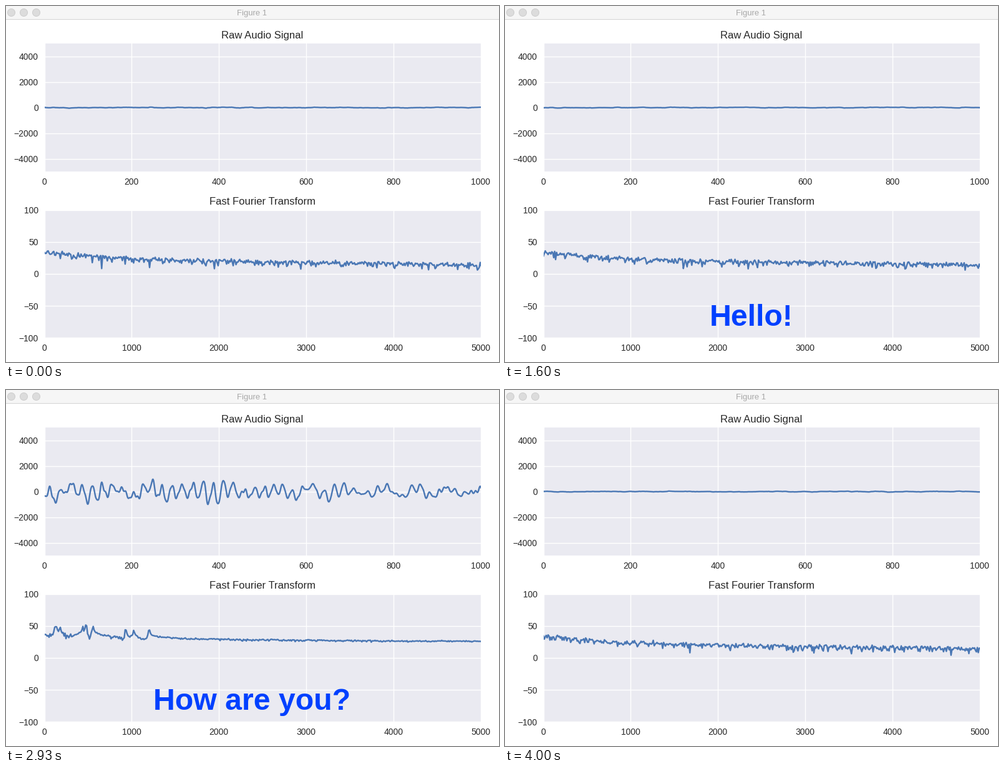
These frames come from a looping animation (790x570 px, 4130 ms). A matplotlib script:

```python
import numpy as np
import matplotlib.pyplot as plt
from matplotlib.animation import FuncAnimation
from matplotlib.patches import Circle, Rectangle

W, H, DPI = 790, 570, 100
RATE, SIZE = 11025, 1024
LOOP, STEP = 4130, 35
INK = "#262626"

x = np.arange(SIZE)
freq = np.fft.rfftfreq(SIZE, 1 / RATE)

# Refresh times of the plots in ms; a stalled refresh repeats the one before.
starts = 10 * np.round(np.arange(61) * 20 / 3)
STALLS = (27, 43, 58)
CLICK_TICK = 11
HUM_TICKS = range(32, 36)


def loudness(tick):
    """Power of ten of the speech peak: two words, each swelling and fading."""
    return np.interp(tick, [24, 25, 29, 35, 40, 42, 44, 46, 50, 52, 58],
                     [1, 3.8, 3.9, 1.2, 1, 2.85, 3, 3.85, 3.95, 3.6, 1])


def caption_at(tick):
    if 21 <= tick < 39:
        return "Hello!"
    return "How are you?" if 39 <= tick < 56 else ""


def room_noise(rng, lift):
    floor = 17.5 + 17 * np.exp(-freq / 1100) - 4 * (freq / 5000) ** 4 + lift
    re, im = rng.normal(scale=np.sqrt(0.5), size=(2, freq.size))
    return np.fft.irfft(10 ** (floor / 10) * (re + 1j * im), SIZE)


def partials(rng, freqs):
    phases = rng.uniform(0, 2 * np.pi, len(freqs))
    return np.sin(2 * np.pi * np.outer(freqs, x) / RATE + phases[:, None]).sum(axis=0)


def voice(rng):
    """Three formants, each a cluster of close partials."""
    total = sum(weight * partials(rng, rng.normal(centre, 0.12 * centre, 5))
                for centre, weight in ((150, 0.8), (500, 1), (1080, 0.25)))
    return total / np.abs(total).max()


def hum():
    turn = 2 * np.pi / SIZE
    swell = 0.65 + 0.35 * np.cos(4 * turn * (x - 380))
    return swell * np.cos(51 * turn * (x - 47))


def click(rng):
    """A growing ripple that ends in a short damped pulse."""
    since = x - 995
    ripple = partials(rng, rng.uniform(700, 1500, 40))
    ripple *= 180 / ripple.std() * np.exp(since / 270)
    t = np.maximum(since, 0)
    pulse = -1900 * np.sin(2 * np.pi * 1600 * t / RATE) * np.exp(-t / 8)
    return np.where(since < 0, ripple, pulse)


def record(tick):
    if tick in STALLS:
        tick -= 1
    rng = np.random.default_rng(100 + tick)
    loud = loudness(tick)
    noise = room_noise(rng, 1.5 * (loud - 1))
    if tick == CLICK_TICK:
        return noise + click(rng)
    if loud == 1:
        return noise
    return noise + 10 ** loud * (hum() if tick in HUM_TICKS else voice(rng))


signals = [record(k) for k in range(len(starts))]
spectra = [10 * np.log10(np.abs(np.fft.rfft(s)) + 0.5) for s in signals]

plt.rcParams.update({"font.family": "Liberation Sans", "text.color": INK,
                     "toolbar": "None"})
fig = plt.figure(figsize=(W / DPI, H / DPI), dpi=DPI, facecolor="white")


def add_plot(top, title, xmax, ymax, xstep, yticks):
    ax = fig.add_axes([61.5 / W, 1 - (top + 204.7) / H, 699 / W, 204.7 / H],
                      facecolor="#eaeaf1")
    ax.set(xlim=(0, xmax), ylim=(-ymax, ymax),
           xticks=range(0, xmax + 1, xstep), yticks=yticks)
    ax.set_title(title, fontsize=12, pad=6)
    ax.tick_params(length=0, pad=7, labelsize=10, labelcolor=INK)
    ax.grid(color="white", linewidth=1)
    ax.set_axisbelow(True)
    ax.spines[:].set_visible(False)
    line, = ax.plot([], [], color="#4a77b4", linewidth=1.75, solid_joinstyle="round")
    return line


raw_line = add_plot(60.3, "Raw Audio Signal", 1000, 5000, 200, range(-4000, 4001, 2000))
fft_line = add_plot(326.5, "Fast Fourier Transform", 5000, 100, 1000, range(-100, 101, 50))

# Window frame and caption, in pixels from the top left.
stage = fig.add_axes([0, 0, 1, 1])
stage.set(xlim=(0, W), ylim=(H, 0))
stage.axis("off")
stage.add_patch(Rectangle((0, 0), W, 21, color="#f6f6f6", linewidth=0))
stage.add_patch(Rectangle((0, 21), W, 1, color="#d3d3d3", linewidth=0))
for cx in (8.5, 28.5, 48.5):
    stage.add_patch(Circle((cx, 10.5), 6, facecolor="#dcdcdc", edgecolor="#cdcdcd",
                           linewidth=0.7))
stage.text(394, 15.5, "Figure 1", fontsize=13 * 72 / DPI, color="#a8a8a8", ha="center")
caption = stage.text(394.5, 512, "", fontsize=48.3 * 72 / DPI, weight="bold",
                     color="#0040ff", ha="center")


def draw(n):
    tick = np.searchsorted(starts, n * STEP + 30, "right") - 1
    raw_line.set_data(x, signals[tick])
    fft_line.set_data(freq, spectra[tick])
    caption.set_text(caption_at(tick))
    return raw_line, fft_line, caption


ani = FuncAnimation(fig, draw, frames=LOOP // STEP, init_func=lambda: draw(0),
                    interval=STEP, repeat=True, repeat_delay=0)
plt.show()
```
